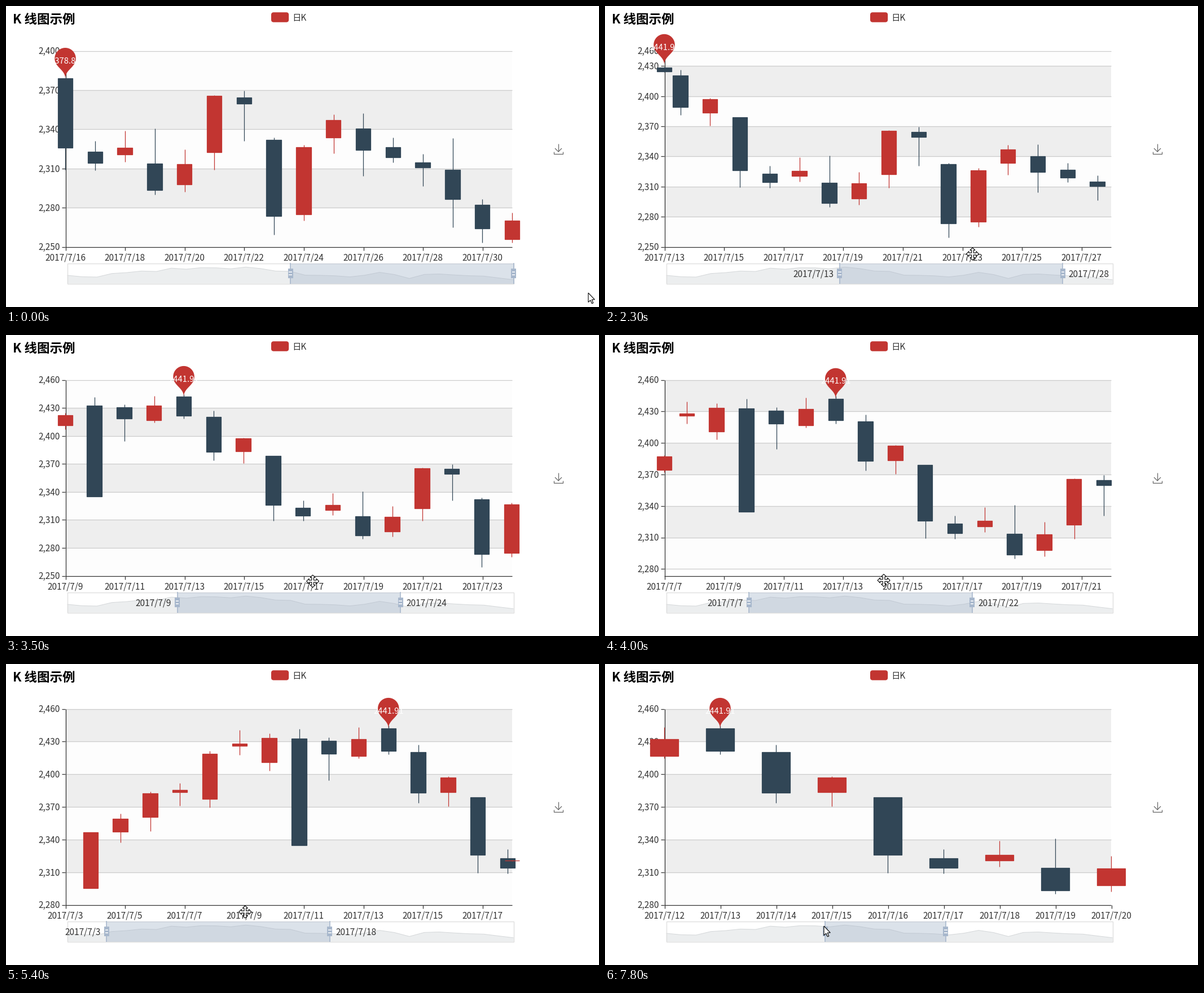
A matplotlib script for the animation above (8000 ms loop, 1051 by 533 pixels).

```python
import math

import numpy as np
import matplotlib.pyplot as plt
from matplotlib.animation import FuncAnimation
from matplotlib.patches import FancyBboxPatch, Polygon, Rectangle

W, H, DPI = 1051, 533, 128
PT = 72 / DPI
LOOP, TICK = 8000, 100

RED, NAVY, INK, STEEL = "#c23531", "#314656", "#333333", "#a7b7cc"
LEFT, RIGHT, TOP, BASE = 105, 897, 79.5, 426.5
BAR_X, BAR_W, BAR_TOP, BAR_BASE = 108.5, 791, 455.5, 491.5

# open, close, low, high for each day of the month
DATA = np.array([
    [2320.26, 2320.26, 2287.3, 2362.94], [2300, 2291.3, 2288.26, 2308.38],
    [2295.35, 2346.5, 2295.35, 2345.92], [2347.22, 2358.98, 2337.35, 2363.8],
    [2360.75, 2382.48, 2347.89, 2383.76], [2383.43, 2385.42, 2371.23, 2391.82],
    [2377.41, 2419.02, 2369.57, 2421.15], [2425.92, 2428.15, 2417.58, 2440.38],
    [2411, 2433.13, 2403.3, 2437.42], [2432.68, 2334.48, 2427.7, 2441.73],
    [2430.69, 2418.53, 2394.22, 2433.89], [2416.62, 2432.4, 2414.4, 2443.03],
    [2441.91, 2421.56, 2418.43, 2444.8], [2420.26, 2382.91, 2373.53, 2427.07],
    [2383.49, 2397.18, 2370.61, 2397.94], [2378.82, 2325.95, 2309.17, 2378.82],
    [2322.94, 2314.16, 2308.76, 2330.88], [2320.62, 2325.82, 2315.01, 2338.78],
    [2313.74, 2293.34, 2289.89, 2340.71], [2297.77, 2313.22, 2292.03, 2324.63],
    [2322.32, 2365.59, 2308.92, 2366.16], [2364.54, 2359.51, 2330.86, 2369.65],
    [2332.08, 2273.4, 2259.25, 2333.54], [2274.81, 2326.31, 2270.1, 2328.14],
    [2333.61, 2347.18, 2321.6, 2351.44], [2340.44, 2324.29, 2304.27, 2352.02],
    [2326.42, 2318.61, 2314.59, 2333.67], [2314.68, 2310.59, 2296.58, 2320.96],
    [2309.16, 2286.6, 2264.83, 2333.29], [2282.17, 2263.97, 2253.25, 2286.33],
    [2255.77, 2270.28, 2253.31, 2276.22]])

# left edge of the zoom window (in days) over time
DRAG = np.array([
    (1300, 15), (2088, 12.5), (2300, 11.66), (3140, 8.5), (3500, 7.4),
    (4288, 4.5), (4500, 3.45), (5030, 1.15), (5200, 1.15), (5242, 1.5),
    (5400, 2.65), (5800, 3.79), (6476, 3.79), (6478, 5.6), (6700, 7.3),
    (7150, 10.68)])
RESIZE = 6300   # from here on only the left handle moves
LAG = 140       # delay between dragging and the chart update


def window(t):
    start = np.interp(t, DRAG[:, 0], DRAG[:, 1])
    return start, start + 15 if t < RESIZE else 18.79


def day(pos):
    return int(math.floor(pos + 0.5))


def date(i):
    return f"2017/7/{i + 1}"


# ---------- chart state ----------

class Tween:
    def __init__(self, start, end, t0, span):
        self.start, self.end = np.asarray(start, float), np.asarray(end, float)
        self.t0, self.span = t0, span

    def at(self, t):
        k = min(max((t - self.t0) / self.span, 0), 1)
        return self.start + (self.end - self.start) * (1 - (1 - k) ** 3)


def retarget(old, goals, t, births=None):
    new = {}
    for key, goal in goals.items():
        if key in old:
            new[key] = Tween(old[key].at(t), goal, t, 300)
        elif births:
            new[key] = Tween(births[key], goal, t, 1000)
        else:
            new[key] = Tween(goal, goal, t, 1)
    return new


def update(state, lo, hi, t):
    rows = DATA[lo:hi + 1]
    bottom = math.floor(rows.min() / 30) * 30
    top = math.ceil(rows.max() / 30) * 30
    step = (RIGHT - LEFT) / (hi - lo)

    def px(i):
        return LEFT + (i - lo) * step

    def py(v):
        return BASE - (v - bottom) / (top - bottom) * (BASE - TOP)

    goals, births = {}, {}
    for i in range(lo, hi + 1):
        goals[i] = [px(i), step / 2, *py(DATA[i])]
        births[i] = [px(i), step / 2] + [py(DATA[i, 0])] * 4
    peak = lo + int(rows[:, 0].argmax())
    every = 1 if step >= 95 else 2
    return {
        "candles": retarget(state.get("candles", {}), goals, t, births),
        "yticks": retarget(state.get("yticks", {}),
                           {v: py(v) for v in range(bottom, top + 1, 30)}, t),
        "xticks": retarget(state.get("xticks", {}),
                           {i: px(i) for i in range(lo, hi + 1, every)}, t),
        "pin": retarget(state.get("pin", {}),
                        {"max": [px(peak), py(DATA[peak, 0])]}, t),
        "peak": DATA[peak, 0],
        "span": (lo, hi),
    }


def simulate():
    snaps = []
    state = update({}, 15, 30, -2000)
    for t in range(0, LOOP, 4):
        span = tuple(day(p) for p in window(t - LAG))
        if span != state["span"]:
            state = update(state, *span, t)
        if t % TICK == 0:
            snap = {name: {k: tw.at(t) for k, tw in state[name].items()}
                    for name in ("candles", "yticks", "xticks", "pin")}
            snap["peak"], snap["span"] = state["peak"], state["span"]
            snaps.append(snap)
    return snaps


SNAPS = simulate()

# ---------- drawing helpers ----------

fig = plt.figure(figsize=(W / DPI, H / DPI), dpi=DPI, facecolor="white")
ax = fig.add_axes([0, 0, 1, 1])
ax.set_xlim(0, W)
ax.set_ylim(H, 0)
ax.axis("off")


def text(x, mid, s, size=15.4, ha="left", color=INK, z=2, weight="normal"):
    return ax.text(x, mid + 0.36 * size, s, fontsize=size * PT, ha=ha,
                   va="baseline", color=color, zorder=z, weight=weight,
                   family="Noto Sans CJK JP")


def line(xs, ys, color=INK, width=1.25, z=2):
    return ax.plot(xs, ys, color=color, lw=width * PT, zorder=z,
                   solid_capstyle="butt", solid_joinstyle="miter")[0]


def rect(x0, y0, x1, y1, color, edge="none", width=0, z=1, alpha=None):
    return ax.add_patch(Rectangle((x0, y0), x1 - x0, y1 - y0, fc=color,
                                  ec=edge, lw=width * PT, zorder=z,
                                  alpha=alpha, joinstyle="miter"))


def shape(pts, color, edge="none", width=0, z=1, alpha=None):
    return ax.add_patch(Polygon(pts, closed=True, fc=color, ec=edge,
                                lw=width * PT, zorder=z, alpha=alpha))


def bezier(p0, p1, p2, p3):
    u = np.linspace(0, 1, 16)[:, None]
    p0, p1, p2, p3 = map(np.array, (p0, p1, p2, p3))
    return ((1 - u) ** 3 * p0 + 3 * u * (1 - u) ** 2 * p1
            + 3 * u * u * (1 - u) * p2 + u ** 3 * p3)


def pin_outline(r=18.75, h=62.5):
    dy = r * r / (h - r)
    cy = r + dy - h
    ang = math.asin(dy / r)
    dx = r * math.cos(ang)
    a = np.linspace(math.pi - ang, 2 * math.pi + ang, 50)
    arc = np.column_stack([r * np.cos(a), cy + r * np.sin(a)])
    cx = dx - math.sin(ang) * 0.6 * r
    cpy = cy + dy + math.cos(ang) * 0.6 * r
    side = bezier((dx, cy + dy), (cx, cpy), (0, -0.7 * r), (0, 0))
    return np.vstack([arc, side, side[::-1] * [-1, 1]])


PIN = pin_outline()

ARM = np.array([(-1.8, -1.8), (-1.8, -6.5), (-4.6, -6.5), (0, -11),
                (4.6, -6.5), (1.8, -6.5)])
CURSORS = {
    "arrow": np.array([(0, 0), (0, 16.5), (3.8, 13), (6.4, 18.8), (8.8, 17.8),
                       (6.3, 12), (11.3, 11.8)]),
    "move": np.vstack([ARM @ np.array([[c, s], [-s, c]])
                       for c, s in ((1, 0), (0, 1), (-1, 0), (0, -1))]),
    "resize": np.array([(-11, 0), (-6, -5), (-6, -1.8), (6, -1.8), (6, -5),
                        (11, 0), (6, 5), (6, 1.8), (-6, 1.8), (-6, 5)]),
}


def bar_x(pos):
    return BAR_X + pos / 30 * BAR_W


def cursor(t):
    grip = bar_x(window(t)[0])
    if t < 1300:
        kind = "arrow" if t < 500 else "move"
        return (kind, np.interp(t, [0, 700], [1032, 740]),
                np.interp(t, [0, 700], [508, 440]))
    if t <= 5800:
        keys = [1300, 2300, 3500, 4500, 5400, 5800]
        off = np.interp(t, keys, [236, 235.5, 240, 238, 245.5, 241])
        return "move", grip + off, np.interp(t, keys, [440, 439, 436, 433, 439, 438])
    if t < 7500:
        kind = "move" if t < 6200 else "resize"
        return (kind, grip + np.interp(t, [5800, 6200], [241, 0]),
                np.interp(t, [5800, 6200], [438, 456]))
    return "arrow", 388, 464


# ---------- fixed parts ----------

def draw_static():
    text(12, 22.7, "K 线图示例", 22.5, color="black", weight="bold")
    ax.add_patch(FancyBboxPatch((470, 11.2), 31.2, 17.5, fc=RED, ec="none",
                                boxstyle="round,pad=0,rounding_size=4.4"))
    text(507, 20, "日K")
    grey = "#666666"
    line([979, 979], [244, 257.5], grey)
    line([973, 979, 985], [252, 258, 252], grey)
    line([971.2, 971.2, 986.8, 986.8], [257.5, 262, 262, 257.5], grey)

    line([LEFT + .5] * 2, [TOP, BASE], z=2.5)
    line([LEFT, RIGHT], [BASE, BASE], z=2.5)

    opens = DATA[:, 0]
    room = 0.3 * np.ptp(opens)
    rise = (opens - opens.min() + room) / (np.ptp(opens) + 2 * room)
    xs = BAR_X + np.arange(31) / 30 * BAR_W
    ys = BAR_BASE - rise * (BAR_BASE - BAR_TOP)
    ends = [(BAR_X + BAR_W, BAR_BASE), (BAR_X, BAR_BASE)]
    shape(np.vstack([np.column_stack([xs, ys]), ends]), "#2f4554", alpha=0.09)
    line(xs, ys, "#d5d8da", 1)
    rect(BAR_X, BAR_TOP, BAR_X + BAR_W, BAR_BASE, "none", "#dddddd", 1.25, z=2)


# ---------- moving parts ----------

def draw_axes(snap):
    out = []
    ticks = sorted(snap["yticks"].items())
    ys = [float(y) for _, y in ticks]
    for k, (y0, y1) in enumerate(zip(ys, ys[1:])):
        out.append(rect(LEFT, y1, RIGHT, y0, "#eeeeee" if k % 2 else "#fdfdfd", z=0))
    for v, y in ticks:
        y = float(y)
        if y < BASE - 1:
            out.append(line([LEFT, RIGHT], [y, y], "#cccccc", z=1))
        out.append(line([98.7, LEFT], [y, y]))
        out.append(text(95.5, y + 0.4, f"{v:,}", ha="right"))
    for i, x in snap["xticks"].items():
        x = float(x)
        out.append(line([x + .5] * 2, [BASE, BASE + 6.25]))
        out.append(text(x, 444.7, date(i), ha="center"))
    return out


def draw_candles(snap):
    out = []
    for i, (x, w, yo, yc, ylow, yhigh) in snap["candles"].items():
        color = RED if DATA[i, 1] > DATA[i, 0] else NAVY
        z = 4 + i * 0.01
        out.append(line([x + .3] * 2, [yhigh, ylow], color, z=z))
        out.append(rect(x - w / 2, min(yo, yc), x + w / 2, max(yo, yc),
                        color, color, 1.25, z=z + 0.005))
    x, y = snap["pin"]["max"]
    out.append(shape(PIN + [x, y], RED, z=6))
    out.append(text(x, y - 32, f"{snap['peak']:.2f}", 14.8, "center", "white", 7))
    return out


def draw_slider(snap, t):
    a, b = map(bar_x, window(t))
    out = [rect(a, BAR_TOP, b, BAR_BASE, STEEL, alpha=0.4, z=3)]
    for x in (a, b):
        out.append(line([x, x], [BAR_TOP - .5, BAR_BASE + .5], STEEL, 1.6, z=3.1))
        out.append(rect(x - 4.5, 465, x + 4.5, 481.5, STEEL, z=3.2))
        for y in (471, 475.5):
            out.append(line([x - 2.7, x + 2.7], [y, y], "white", 1.5, z=3.3))
    if 500 <= t < 7500:
        lo, hi = snap["span"]
        out.append(text(a - 10.5, 474.3, date(lo), ha="right", z=3.5))
        out.append(text(b + 10.5, 474.3, date(hi), z=3.5))
    return out


moving = []


def draw(n):
    while moving:
        moving.pop().remove()
    t, snap = n * TICK, SNAPS[n]
    moving.extend(draw_axes(snap) + draw_candles(snap) + draw_slider(snap, t))
    kind, x, y = cursor(t)
    moving.append(shape(CURSORS[kind] + [x, y], "white", "black", 1.1, z=9))
    return moving


draw_static()
anim = FuncAnimation(fig, draw, frames=LOOP // TICK, interval=TICK,
                     repeat=True, repeat_delay=0, blit=False)
plt.show()
```
